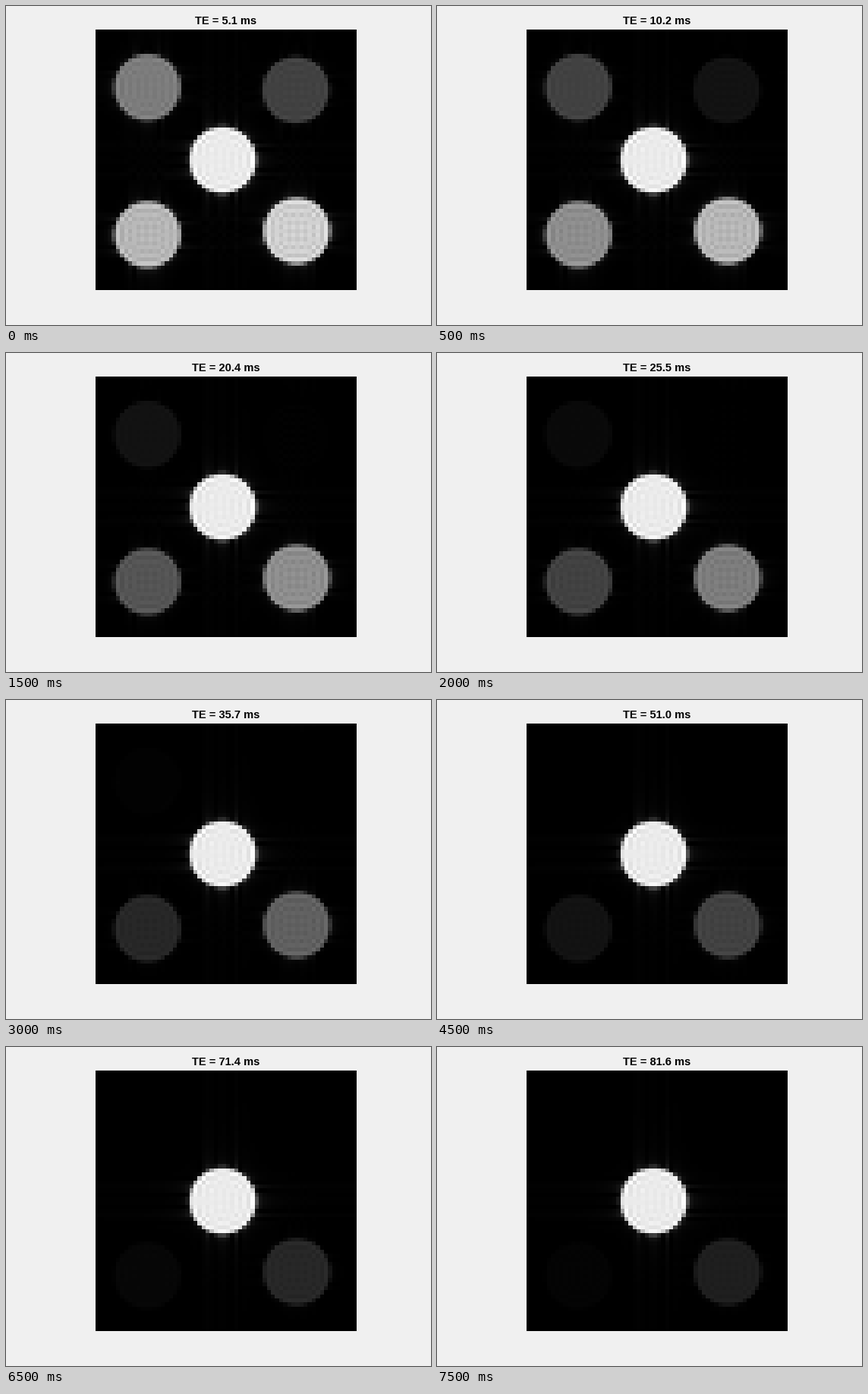
Animation of 560 by 420 pixels, one loop 8 s. Source, as a matplotlib script:

```python
import numpy as np
import matplotlib.pyplot as plt
from matplotlib.animation import FuncAnimation

W, H, DPI = 560, 420, 100
N, FINE = 64, 16            # image matrix, sub-samples per cell
ECHO = 5.1                  # echo spacing in ms
FRAMES = 16
RADIUS = 8.22

# centre x, centre y (in cells), T2 in ms
TUBES = [
    (12.72, 14.2, 8.0),
    (49.1, 14.85, 4.0),
    (31.15, 32.05, np.inf),
    (12.75, 50.4, 20.0),
    (49.35, 49.5, 40.0),
]


def disc(cx, cy):
    """Disc seen through a truncated k-space, with its Gibbs ringing."""
    n = N * FINE
    pos = np.arange(n) / FINE + 0.5
    mask = np.hypot(pos[None, :] - cx, pos[:, None] - cy) < RADIUS
    k = np.fft.fftshift(np.fft.fft2(mask.astype(float)))
    lo = n // 2 - N // 2
    k = k[lo:lo + N, lo:lo + N]
    return np.fft.ifft2(np.fft.ifftshift(k)) / FINE**2


DISCS = [disc(x, y) for x, y, _ in TUBES]


def scan(te):
    img = np.abs(sum(np.exp(-te / t2) * d
                     for d, (_, _, t2) in zip(DISCS, TUBES)))
    return img / img.max()


fig = plt.figure(figsize=(W / DPI, H / DPI), dpi=DPI, facecolor="#f0f0f0")
ax = fig.add_axes([118 / W, 46 / H, 343 / W, 343 / H])
ax.axis("off")
view = ax.imshow(scan(ECHO), cmap="gray", vmin=0, vmax=1,
                 interpolation="nearest", aspect="auto")
title = fig.text(289.5 / W, 1 - 24 / H, "", ha="center", va="baseline",
                 family="Liberation Sans", weight="bold",
                 size=14.67 * 72 / DPI, color="black")


def update(i):
    te = ECHO * (i + 1)
    view.set_data(scan(te))
    title.set_text(f"TE = {te:.1f} ms")
    return view, title


anim = FuncAnimation(fig, update, frames=FRAMES, interval=500,
                     repeat=True, repeat_delay=0)
plt.show()
```
